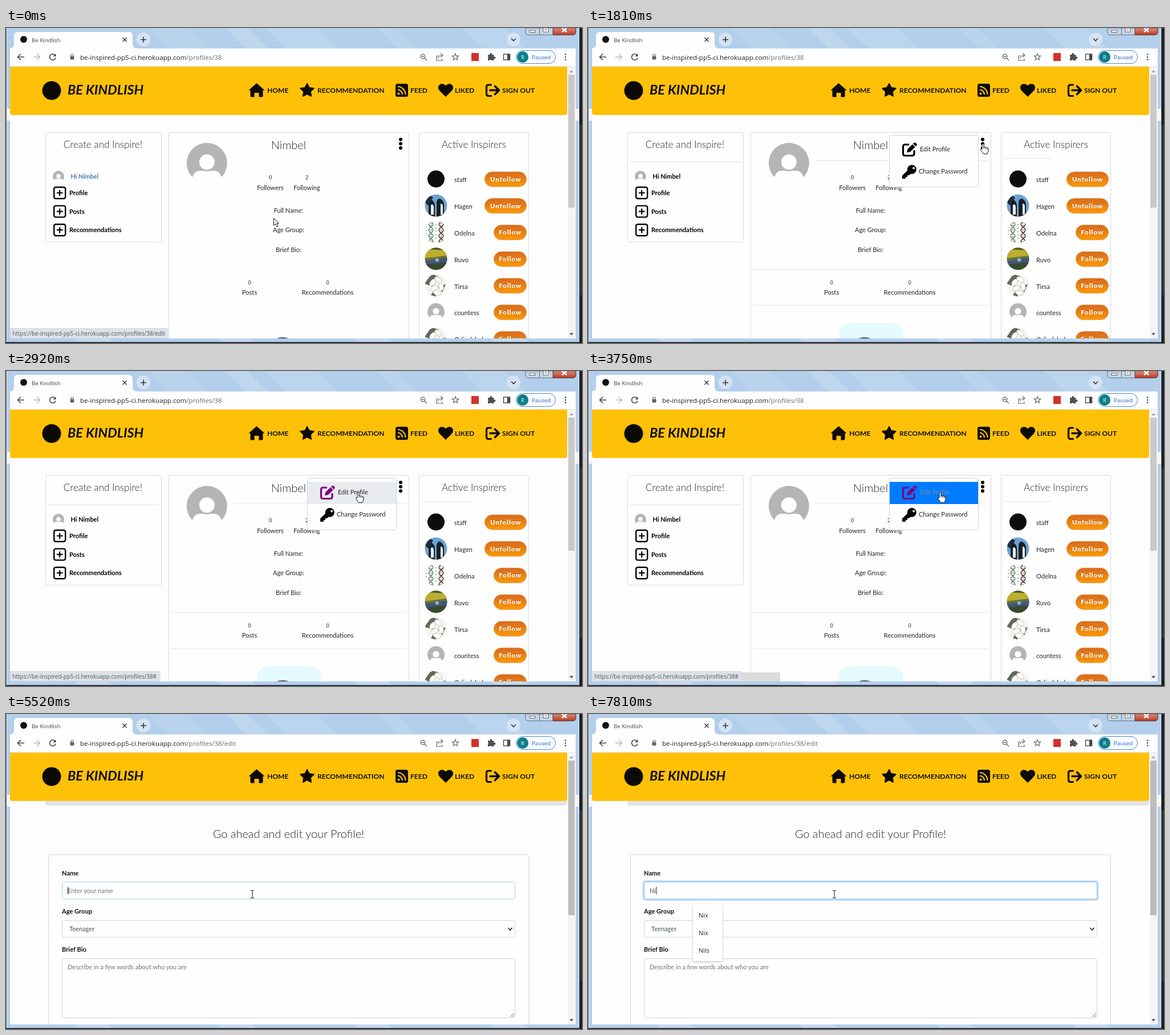
Animation, 1010 px wide and 554 px high, one loop 8000 ms. Source, as an HTML page:

```html
<!DOCTYPE html>
<html lang="en">
<head>
<meta charset="utf-8">
<title>Profile editing</title>
<style>
html, body { margin: 0; width: 100%; height: 100%; overflow: hidden; background: #fdfdfd; }
svg { display: block; width: 100vw; height: 100vh; }
text { font-family: Lato, "Open Sans", sans-serif; white-space: pre; }
.ui { font-family: "Open Sans", "Noto Sans", sans-serif; }
</style>
</head>
<body>
<svg id="stage" viewBox="0 0 1010 554" xmlns="http://www.w3.org/2000/svg"></svg>
<script>
const LOOP = 8000;
const HOST = 'be-inspired-pp5-ci.herokuapp.com';
const BRAND = 'Be Kindlish', USER = 'Nimbel';
const INK = '#212529';

const el = (tag, attrs, body = '') =>
  `<${tag} ${Object.entries(attrs).map(([k, v]) => `${k}="${v}"`).join(' ')}>${body}</${tag}>`;
const rect = (x, y, width, height, fill, more = {}) => el('rect', { x, y, width, height, fill, ...more });
const circle = (cx, cy, r, fill, more = {}) => el('circle', { cx, cy, r, fill, ...more });
const path = (d, fill, more = {}) => el('path', { d, fill, ...more });
const line = (d, stroke, width = 1, more = {}) =>
  path(d, 'none', { stroke, 'stroke-width': width, ...more });
const text = (s, x, y, size, fill = INK, more = {}) =>
  el('text', { x, y, 'font-size': size, fill, ...more }, s);
const mid = (s, x, y, size, fill = INK, more = {}) => text(s, x, y, size, fill, { 'text-anchor': 'middle', ...more });
const ui = (s, x, y, size, fill, more = {}) => text(s, x, y, size, fill, { class: 'ui', ...more });
const heading = (s, x, y, size) => mid(s, x, y, size, INK, { 'font-weight': 300 });
const group = (body, more = {}) => el('g', more, body);
const bold = { 'font-weight': 700 };
const box = (x, y, w, h, stroke, more = {}) => rect(x, y, w, h, '#fefefe', { rx: 3, stroke, ...more });

const defs = `<defs>
  <linearGradient id="btn" x1="0" y1="0" x2="0" y2="1">
    <stop offset="0" stop-color="#d9691f"/><stop offset=".5" stop-color="#ea800f"/><stop offset="1" stop-color="#fb9a05"/>
  </linearGradient>
  <linearGradient id="close" x1="0" y1="0" x2="0" y2="1">
    <stop offset="0" stop-color="#d98d7c"/><stop offset="1" stop-color="#bd3a22"/>
  </linearGradient>
  <clipPath id="page"><rect x="7" y="68" width="992" height="478"/></clipPath>
  <clipPath id="round"><circle r="19.5"/></clipPath>
  <filter id="lift" x="-20%" y="-20%" width="140%" height="140%">
    <feDropShadow dx="0" dy="1" stdDeviation="1.5" flood-opacity=".3"/>
  </filter>
</defs>`;

function windowFrame() {
  const streak = (x, w, o) => path(`M${x} 0h${w}l36 36h${-w}z`, '#fff', { opacity: o });
  const low = (x, w) => path(`M${x} 546h${w}l7 6h${-w}z`, '#fff', { opacity: .2 });
  const g = '#5f6368', k = '#333';
  return rect(0, 0, 1010, 554, '#1c1d1b') +
    rect(1006, 170, 4, 300, '#34332a') +
    rect(0, 0, 1005, 552, '#b3cfeb') + line('M.5 0V552M0 552.500H1005M1005.500 0V552', '#4e5c69') +
    line('M1.500 0V552', '#e3eef9') + line('M1004.500 0V552', '#dbe9f7') +
    streak(250, 70, .08) + streak(385, 38, .14) + streak(455, 90, .12) + streak(650, 34, .1) + streak(800, 75, .12) +
    [120, 370, 610, 850].map(x => low(x, 60)).join('') +
    rect(1, 142, 6, 21, '#f2f6fb') + rect(999, 142, 6, 21, '#f2f6fb') +
    path('M911 0h88v7q0 5-5 5h-78q-5 0-5-5z', '#c6d6e7', { stroke: '#5d6f82' }) +
    path('M959 0h40v7q0 5-5 5h-35z', 'url(#close)', { stroke: '#5d3430' }) +
    line('M935.500 0v12', '#5d6f82') +
    rect(918, 4, 10, 3.5, '#fff', { stroke: '#444', 'stroke-width': .8 }) +
    rect(942, 0, 9, 7, '#fff', { stroke: '#444', 'stroke-width': .8 }) + rect(945, 2, 3, 2, '#789') +
    line('M975 0l8 7M983 0l-8 7', '#fff', 2.4) +
    path('M6 36q8 0 8-8V14q0-7 7-7h194q7 0 7 7v14q0 8 8 8z', '#fefefe') +
    rect(7, 36, 992, 32, '#fefefe') + line('M7 67.500H999', '#dfe3e8') +
    circle(31, 20, 6, '#111') + ui(BRAND, 45, 24.5, 9.8, '#3c4043') +
    line('M204.500 17l7 7M211.500 17l-7 7', k, 1.4) +
    circle(241, 20, 12, '#d4e3f4') + line('M236 20.500h10M241 15.500v10', k, 1.6) +
    circle(890, 20, 12, '#d4e3f4') + line('M886 18.500l4 4 4-4', k, 1.6) +
    line('M32 51H21M26 45.500L20.500 51l5.500 5.500', '#444', 1.6) +
    line('M48 51h11M54 45.500l5.500 5.500-5.500 5.500', '#b9bbbe', 1.6) +
    line('M86.300 48a5.300 5.300 0 1 0 .7 4.500', '#444', 1.6) + path('M87.500 45v5h-5z', '#444') +
    rect(112.5, 49.5, 7, 6, g, { rx: 1 }) + line('M114 50v-2q0-2 2-2t2 2v2', g, 1.2) +
    ui(`${HOST}<tspan id="path" fill="#666b70"></tspan>`, 130, 55.5, 11.6, '#202124') +
    circle(731, 50, 3.8, 'none', { stroke: g, 'stroke-width': 1.3 }) + line('M729 50h4M734 53l4 4', g, 1.3) +
    line('M758 49h-3v8h10v-3M757.500 53q1-5 7-5M762 44.500l4 3.500-4 3.500', g, 1.2) +
    path(star(788, 51, 6, 2.6), 'none', { stroke: g, 'stroke-width': 1.2 }) +
    rect(816, 44, 13, 14, '#d3312b') +
    path('M845 47h3.500a2 2 0 1 1 3.500 0h3.500v3.500a2 2 0 1 1 0 3.500v3h-4a2 2 0 0 0-3.500 0h-3v-4a2 2 0 0 0 0-3z', '#4d5155') +
    rect(872.5, 46, 11, 10, '#fff', { stroke: '#444', 'stroke-width': 1.4 }) + rect(879, 46, 5, 10, '#444') +
    rect(894.5, 39.5, 69, 23, '#f8fbff', { rx: 11.5, stroke: '#4a86d8' }) +
    circle(906, 51, 10, '#0b7f89') + ui('R', 906, 54.5, 9.5, '#fff', { 'text-anchor': 'middle' }) +
    ui('Paused', 922, 54.7, 9.7, '#2b67c4') +
    [46.5, 51, 55.5].map(y => circle(981, y, 1.3, '#444')).join('');
}

function star(cx, cy, R, r) {
  let d = '';
  for (let i = 0; i < 10; i++) {
    const a = i * Math.PI / 5 - Math.PI / 2, q = i % 2 ? r : R;
    d += `${i ? 'L' : 'M'}${(cx + q * Math.cos(a)).toFixed(1)} ${(cy + q * Math.sin(a)).toFixed(1)}`;
  }
  return d + 'z';
}

function navBar() {
  const link = (s, x) => text(s, x, 114, 12.1, '#111', bold);
  const K = '#0c0a04', Y = '#ffc107';
  return path('M7 68H984V149q0 4-4 4H11q-4 0-4-4z', Y) +
    circle(80, 110, 16.5, K) +
    text(BRAND.toUpperCase(), 108, 117, 23.3, K, { ...bold, 'font-style': 'italic' }) +
    path('M439.500 97L453.500 109.500h-3v10q0 2-2 2h-5v-7.500h-8v7.500h-5q-2 0-2-2V109.500h-3z', K) + link('HOME', 458) +
    path(star(528, 110, 12.5, 6.4), K, { stroke: K, 'stroke-width': 1.5, 'stroke-linejoin': 'round' }) +
    link('RECOMMENDATION', 546) +
    rect(683, 98, 22, 23, K, { rx: 3.5 }) + circle(688.5, 115.5, 2, Y) +
    line('M687 108.500a8.500 8.500 0 0 1 8 8.500M687 103a14 14 0 0 1 13.500 14', Y, 2.2) + link('FEED', 709) +
    path('M771 121L760.500 110.500C753 101.500 764 93.500 771 101.500C778 93.500 789 101.500 781.500 110.500z', K) + link('LIKED', 787) +
    line('M850.500 100H846q-3.500 0-3.500 3.500v12.500q0 3.500 3.500 3.500h4.500', K, 3.2, { 'stroke-linecap': 'round' }) +
    line('M849 109.500h13M857.500 102.500l7 7-7 7', K, 3.6, { 'stroke-linecap': 'round', 'stroke-linejoin': 'round' }) +
    link('SIGN OUT', 870);
}

// Grey placeholder portrait
const blank = (x, y, r) => group(
  circle(0, 0, 1, '#b5b5b5') + path('M-.8 1.1C-.7 .2-.35 .4 0 .4S.7 .2 .8 1.1z', '#fefefe') +
  circle(0, -.05, .45, '#b5b5b5') + circle(0, -.05, .38, '#fefefe'),
  { transform: `translate(${x} ${y}) scale(${r})` });

const flowers = rect(-20, -20, 40, 40, '#f4f4f2') +
  path('M-20-3L-8-20 4-16-6 2zM3 2l14-4-6 14zM-3 8l3 12-9-3z', '#5d6b57') +
  [[-6, -5], [4, -10], [9, 2], [-3, 5], [2, 13]].map(([x, y]) =>
    el('ellipse', { cx: x, cy: y, rx: 7, ry: 4, fill: '#fffdfb', stroke: '#cfc9c2', transform: `rotate(${x * 9} ${x} ${y})` })).join('');

function strand(x, color) {
  const wave = s => Array.from({ length: 20 }, (_, i) =>
    `${i ? 'L' : 'M'}${(x + s * 4 * Math.sin(i * .62)).toFixed(1)} ${i * 2 - 19}`).join('');
  let rungs = '';
  for (let i = 0; i < 9; i++) rungs += `M${x - 3} ${i * 4 - 16}h6`;
  return line(rungs, '#cf7a4d', 1.2) + line(wave(1) + wave(-1), color, 1.3);
}

const photos = [
  circle(0, 0, 15, '#0d0d0d'),
  rect(-20, -20, 40, 40, '#6fa3d2') + rect(-20, 8, 40, 12, '#8d9aa3') +
    path('M-13 20V-4q2-10 7-5t4 12v17zM1 20V-6q2-9 8-5t5 14v17z', '#15202a') +
    path('M-9 16V-1q4-3 5 3v14zM8 16V-3q3-2 4 4v15z', '#eef2f4') + path('M-20-6l9-12 6 4-9 14z', '#1d2b3a'),
  rect(-20, -20, 40, 40, '#fcfcfa') + strand(-9, '#4f8f8c') + strand(9, '#333') +
    line('M-17-10v18M0-14V14', '#75b08a', 1.5, { 'stroke-dasharray': '2 4' }),
  rect(-20, -20, 40, 40, '#62733a') + path('M-20-20H20V-6L-20-1z', '#bcae30') + path('M-20-17L20-15v-5h-40z', '#4c5c2c') +
    path('M-20 4L20-2v11L-20 14z', '#43567a') + path('M-20 10L20 6v14h-40z', '#39492e') + circle(2, 2, 3, '#9fb2d8'),
  flowers, '', flowers
];

function plusBox(y) {
  return rect(84.2, y - 10, 20, 20, '#fff', { rx: 3, stroke: '#000', 'stroke-width': 2.4 }) +
    line(`M89 ${y}h10.500M94.200 ${y - 5}v10.500`, '#000', 2.2);
}

function follower(name, i) {
  const y = 266 + i * 46.8, wide = i < 2, x = wide ? 839.5 : 855.5;
  const pic = i === 5 ? blank(754, y - 1, 15)
    : group(photos[i], { transform: `translate(754 ${y - .5})`, 'clip-path': 'url(#round)' });
  const label = (dy, fill) => mid(wide ? 'Unfollow' : 'Follow', (x + 913) / 2, y + 3.7 + dy, 11.3, fill,
    { 'font-weight': 900, 'letter-spacing': 1 });
  return pic + text(name, 786, y + 5.3, 11.2) +
    rect(x, y - 13, 912.5 - x, 26, 'url(#btn)', { rx: 13, stroke: '#dd9144' }) +
    label(-1, '#a04c12') + label(0, '#fffaf0');
}

function profilePage() {
  const edge = '#d9dadb';
  const rules = line('M73 235.500H268M399 233.500H701M290 424.500H701M290 487.500H701M729 229.500H813', '#e3e3e3') +
    rect(440, 519, 113, 50, '#e5fafd', { rx: 20 });
  return box(69.5, 183.5, 203, 193, edge) + box(285.5, 183.5, 421, 400, edge) + box(724.5, 183.5, 192, 400, edge) +
    heading('Create and Inspire!', 170, 210.5, 17.1) + heading('Active Inspirers', 820.5, 210.5, 17.1) +
    group(rules, { id: 'rules' }) +
    el('ellipse', { cx: 485, cy: 553, rx: 17, ry: 9, fill: '#4a4f58' }) +
    blank(92, 261, 10) + text('Hi ' + USER, 113.5, 264.5, 10.9, '#4b77bd', { ...bold, id: 'greeting' }) +
    ['Profile', 'Posts', 'Recommendations'].map((s, i) => {
      const y = 290 + i * 32.6;
      return plusBox(y) + text(s, 111, y + 4, 11.1, '#000', bold);
    }).join('') +
    blank(352.3, 237.5, 35.5) + heading(USER, 495.5, 213, 20) +
    [196, 203.5, 211].map(y => circle(692, y, 3, '#000')).join('') +
    mid('0', 463.5, 265.5, 9) + mid('2', 527.5, 265.5, 9) + mid('Followers', 463.5, 284.5, 11) + mid('Following', 527.5, 284.5, 11) +
    mid('Full Name:', 495.5, 324.5, 11.1) + mid('Age Group:', 495.5, 359, 11.1) + mid('Brief Bio:', 495.5, 393.5, 11.1) +
    mid('0', 427, 450.5, 9) + mid('0', 564, 450.5, 9) + mid('Posts', 427, 469, 11.2) + mid('Recommendations', 564, 469, 11.2) +
    ['staff', 'Hagen', 'Odelna', 'Ruvo', 'Tirsa', 'countess', 'Orlindabel'].map(follower).join('') +
    group(box(528.5, 188.5, 156, 91, '#d5d5d5') +
      rect(529, 195, 155, 39, '#e9ecef', { id: 'row' }) +
      group(line('M563 205H556q-3.500 0-3.500 3.500V221q0 3.500 3.500 3.500H568.500q3.500 0 3.500-3.500v-6', 'currentColor', 3.2) +
        path('M559 219l1.300-6L569 204.500l4.700 4.700-8.700 8.500zM570 203.500l1.500-1.500q1.500-1.200 3 0l1.700 1.700q1.200 1.500 0 3l-1.500 1.500z', 'currentColor'), { id: 'pen' }) +
      text('Edit Profile', 582, 217, 11, INK, { id: 'editLabel' }) +
      path('M551 265v-5.500l9-8.800A8 8 0 1 1 565.500 256.500L563 259h-3v3h-3v3zM571 244.500a2 2 0 1 0 .1 0z', '#000', { 'fill-rule': 'evenodd' }) +
      text('Change Password', 580, 256, 11), { id: 'menu' });
}

function editPage() {
  const label = (s, y) => text(s, 98, y, 11.1, '#111', bold);
  const field = (y, h, more) => box(98.5, y, 794, h, '#ced4da', more);
  return path('M69 140H984V155q0 6-9 6H69z', '#e3e3e3') +
    heading('Go ahead and edit your Profile!', 495.5, 217.5, 19.9) +
    box(74.5, 247.5, 842, 400, '#f8c6d2') +
    label('Name', 284) + label('Age Group', 351) + label('Brief Bio', 417.5) +
    rect(97, 294, 797, 33, 'none', { id: 'ring', rx: 4, stroke: '#007bff', 'stroke-opacity': .25, 'stroke-width': 3 }) +
    field(295.5, 30, { id: 'nameBox' }) + text('', 108, 314.7, 11.05, INK, { id: 'nameText' }) +
    rect(108, 304, 1, 13, '#222', { id: 'caret' }) +
    field(363.5, 29) + text('Teenager', 111, 382, 11.1, '#495057') + line('M880.500 376l3.500 3.800 3.500-3.800', '#333', 1.8) +
    field(430.5, 104) + text('Describe in a few words about who you are', 108, 449, 11.05, '#6c757d') +
    line('M884 533l7-7M888 533l3-3', '#666') +
    group(path('M186 335H198l5-6 5 6H234q2 0 2 2v95q0 3-3 3H187q-3 0-3-3V337q0-2 2-2z', '#fff', { filter: 'url(#lift)' }) +
      ['Nix', 'Nix', 'Nils'].map((s, i) => ui(s, 194, 357.5 + i * 31, 11, '#26282b')).join(''), { id: 'hints' });
}

const scrollBar = rect(985, 68, 14, 478, '#f4f4f4') + rect(986, 82, 11, 234, '#c4c4c4', { id: 'thumb' }) +
  path('M988 78l3.500-4 3.500 4z', '#a5a5a5') + path('M988 536.500l3.500 4 3.500-4z', '#505050');

const status = rect(7, 530, 330, 16, '#dcdcdc', { id: 'statusWide' }) +
  group(path('', '#dee1e6', { id: 'statusBack', stroke: '#d0d3d7', 'stroke-width': .6 }) +
    ui('', 11.5, 541, 9.92, '#55595e', { id: 'statusText' }), { id: 'status' });

const outline = { stroke: '#111', 'stroke-width': 1, 'stroke-linejoin': 'round' };
const cursors =
  group(path('M.5.5V13.200l3-2.800 2.200 5.200 2.300-1-2.200-5H9.500z', '#fff', outline), { id: 'arrow' }) +
  group(path('M-1 1.500q1.500-2 3 0V7q2-1.500 3 .3 2-1 2.800.6 2-.6 2.200 1.200V13L8 18.500H1.500L-3.500 11q0-2.500 2.500-1z', '#fff', outline) +
    line('M2 6v4M5 7v3.500M7.800 8v3', '#111', .7), { id: 'hand' }) +
  group(line('M-3-6.500h2.300L0-6 .7-6.500H3M-3 6.500h2.300L0 6l.7.5H3M0-6V6', '#222', 1.1), { id: 'beam' });

const stage = document.getElementById('stage');
stage.innerHTML = defs + windowFrame() +
  group(rect(7, 68, 992, 478, '#fdfdfd') + group(profilePage(), { id: 'profile' }) + group(editPage(), { id: 'edit' }) +
    navBar() + scrollBar + status, { 'clip-path': 'url(#page)' }) + group(cursors, { id: 'mouse' });

const ids = {};
stage.querySelectorAll('[id]').forEach(n => ids[n.id] = n);
const set = (id, attrs) => { for (const k in attrs) ids[id].setAttribute(k, attrs[k]); };
const show = (id, on) => set(id, { display: on ? 'inline' : 'none' });
const put = (id, s) => { if (ids[id].textContent !== s) ids[id].textContent = s; };

// Progress that advances in n equal ticks between two times
function ticks(t, from, to, n) {
  if (t < from) return 0;
  return Math.min(n, Math.floor((t - from) / (to - from) * (n - 1) + 1e-6) + 1) / n;
}

const moves = [
  [50, 460, 6, 798, 205], [640, 810, 4, 687, 204], [1060, 1180, 3, 692, 203],
  [2420, 2920, 10, 617, 213], [4660, 4840, 4, 460, 306], [5090, 5220, 3, 432, 317]
];

function pointer(t) {
  let x = 469, y = 334;
  for (const [from, to, n, tx, ty] of moves) {
    const p = ticks(t, from, to, n), e = (1 - Math.cos(Math.PI * p)) / 2;
    x += (tx - x) * e;
    y += (ty - y) * e;
  }
  return [x, y];
}

function render(t) {
  const editing = t >= 3800, [x, y] = pointer(t);
  const hover = t >= 2420 && x < 682, pressed = t >= 3590;
  set('mouse', { transform: `translate(${x.toFixed(1)} ${y.toFixed(1)})` });
  const hand = !editing && t >= 640 && x < 697;
  show('arrow', !editing && !hand);
  show('hand', hand);
  show('beam', editing);

  show('profile', !editing);
  show('edit', editing);
  put('path', '/profiles/38' + (editing ? '/edit' : ''));
  set('thumb', { height: editing ? 272 : 234, fill: editing ? '#bcbcbc' : '#c9c9c9' });

  set('rules', { opacity: ticks(t, 50, 214, 3) });
  set('greeting', { fill: t < 50 ? '#4b77bd' : '#000' });
  show('menu', t >= 1810);
  show('row', hover);
  set('row', { fill: pressed ? '#007bff' : '#e9ecef' });
  set('pen', { color: hover ? '#800080' : '#000' });
  set('editLabel', { fill: pressed ? '#7c8ea3' : INK });

  const first = t < 460, w = first ? 277 : 263;
  put('statusText', `https://${HOST}/profiles/38${first ? '/edit' : '#'}`);
  set('statusBack', { d: `M7 546V528h${w - 3}q3 0 3 3v15z` });
  set('status', { opacity: first ? 1 - ticks(t, 132, 378, 4) : hover ? 1 - ticks(t, 3990, 4290, 5) : 0 });
  show('statusWide', t >= 3700 && t < 4065);

  const focus = ticks(t, 5520, 5640, 3), typed = t >= 7810 ? 'Ni' : t >= 7560 ? 'N' : '';
  set('ring', { opacity: t < 5640 ? Math.max(0, focus - 1 / 3) : 1 });
  set('nameBox', { stroke: focus === 0 ? '#ced4da' : focus < .5 ? '#a9cdf2' : '#80bdff' });
  put('nameText', typed || 'Enter your name');
  set('nameText', { fill: typed ? '#495057' : '#6c757d' });
  show('caret', (t >= 5520 && t < 6010) || (t >= 6580 && t < 7070) || t >= 7560);
  set('caret', { x: 108 + (typed ? ids.nameText.getComputedTextLength() + .5 : 0) });
  show('hints', t >= 7560);
}

const start = performance.now();
function frame() {
  render((performance.now() - start) % LOOP);
  requestAnimationFrame(frame);
}
frame();
</script>
</body>
</html>
```
